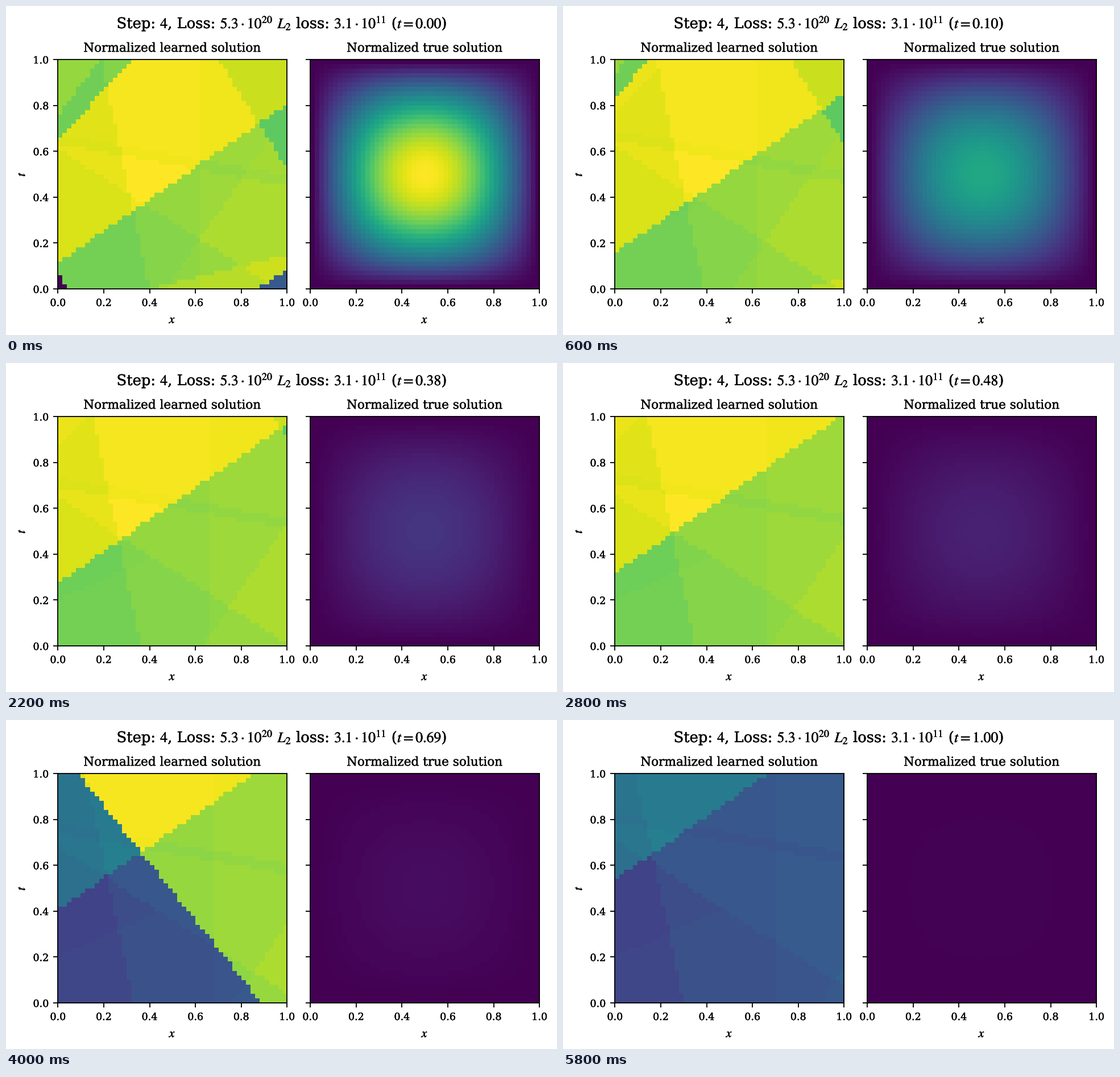
Animation of 969 by 578 pixels, one loop 6 s. Source, as a matplotlib script:

```python
import numpy as np
import matplotlib.pyplot as plt
from matplotlib.animation import FuncAnimation
from matplotlib.patheffects import withStroke
from matplotlib.text import Text

W, H, DPI = 969, 578, 128
FRAMES, CELLS = 30, 50
PX = 72 / DPI      # one pixel in points
PT = 165 / DPI     # nominal point for lines and gaps

plt.rcParams.update({
    "font.family": "DejaVu Serif",
    "mathtext.fontset": "stix",
    "axes.titlesize": 21.6 * PX,
    "axes.titlepad": 6 * PT,
    "axes.labelsize": 21.6 * PX,
    "axes.labelpad": 4 * PT,
    "axes.linewidth": 0.8 * PT,
})
for k in ("xtick", "ytick"):
    plt.rcParams.update({f"{k}.labelsize": 17.5 * PX,
                         f"{k}.major.size": 3.5 * PT,
                         f"{k}.major.pad": 3.5 * PT,
                         f"{k}.major.width": 0.8 * PT})

centers = (np.arange(CELLS) + 0.5) / CELLS
X, Y = np.meshgrid(centers, centers)
wave = np.sin(np.pi * np.linspace(0, 1, CELLS))


def true_solution(t):
    return np.outer(wave, wave) * np.exp(-np.pi**2 / 2 * t)


def learned_solution(t):
    """Piecewise constant field cut by straight fronts that drift with t."""
    above = Y > 0.1125 + 0.423 * t + 0.695 * X      # main diagonal
    swept = Y < -2.64 + 5.44 * t - 1.25 * X         # fast dark front
    right = X > 0.40 - 0.10 * t - 0.21 * Y          # steep seam
    flat = Y - (0.63 + 0.16 * t - 0.18 * X)
    high, band = flat > 0, (flat > 0) & (flat < 0.045)
    over = Y > 0.612 + 0.10 * t - 0.64 * X          # falling seam
    column = X > 0.62 + 0.08 * t                    # vertical seam
    lime = Y < 1.45 * (X - 0.47 - 0.42 * t)         # rising seam
    corner = Y > 1 - 1.6 * (X - 0.70 - 0.62 * t)    # top right corner
    low = Y < -0.1 + 0.25 * X - t                   # bottom edge
    wedge = Y > 0.645 + 1.8 * t + 1.1 * X           # top left corner
    tip = Y > 0.75 + 1.8 * t + 1.35 * X

    green = (0.78 + 0.03 * right + 0.03 * (over & right) + 0.012 * column
             - 0.015 * (band & right)
             + 0.015 * lime + 0.01 * (lime & over & ~high) + 0.045 * low
             + 0.01 * (~over & (Y < 0.2 + 0.45 * X)))
    yellow = (0.965 + 0.03 * right - 0.02 * ~over - 0.008 * column
              - 0.008 * high - 0.008 * band + 0.005 * (right & ~high)
              + 0.015 * (~right & (Y > 0.73 + 0.35 * t + X)))

    blue = 0.20 + 1.2 * (green - 0.78)
    teal = 0.37 + 1.1 * (yellow - 0.945)

    # small regions that leave the square early
    yellow = np.where(corner, 0.92, yellow)
    yellow = np.where(wedge, 0.785 + 0.03 * right, yellow)
    yellow = np.where(tip, 0.84, yellow)
    green = np.where(corner, 0.75, green)
    green = np.where(Y < 0.67 * (X - 0.87) - t, 0.28, green)
    green = np.where(Y < 0.065 - 1.3 * X - 2 * t, 0.0, green)

    return np.where(above, np.where(swept, teal, yellow),
                    np.where(swept, blue, green))


def heading(t):
    return (r"Step: $4$, Loss: $5.3 \cdot 10^{20}$ $L_2$ loss: "
            rf"$3.1 \cdot 10^{{11}}$ ($t={t:.2f}$)")


fig = plt.figure(figsize=(W / DPI, H / DPI), dpi=DPI, facecolor="white")


def panel(left, title, field):
    ax = fig.add_axes([left / W, 1 - 497 / H, 403 / W, 403 / H])
    im = ax.imshow(field(0), cmap="viridis", vmin=0, vmax=1, origin="lower",
                   extent=(0, 1, 0, 1), aspect="auto",
                   interpolation="nearest")
    ticks = np.arange(6) / 5
    ax.set_xticks(ticks)
    ax.set_yticks(ticks)
    ax.set_title(title)
    ax.set_xlabel("$x$")
    return ax, im


ax1, learned = panel(91.3, "Normalized learned solution", learned_solution)
ax2, truth = panel(535.2, "Normalized true solution", true_solution)
ax1.set_ylabel("$t$")
ax2.tick_params(labelleft=False)
title = fig.text(0.5, 1 - 39 / H, heading(0), fontsize=25.8 * PX,
                 ha="center", va="baseline")

# slightly heavier lettering
for label in fig.findobj(Text):
    label.set_path_effects([withStroke(linewidth=0.4 * PX,
                                       foreground="black")])


def update(i):
    t = i / (FRAMES - 1)
    learned.set_data(learned_solution(t))
    truth.set_data(true_solution(t))
    title.set_text(heading(t))
    return learned, truth, title


anim = FuncAnimation(fig, update, frames=FRAMES, interval=200,
                     repeat=True, repeat_delay=0, blit=False)
plt.show()
```
